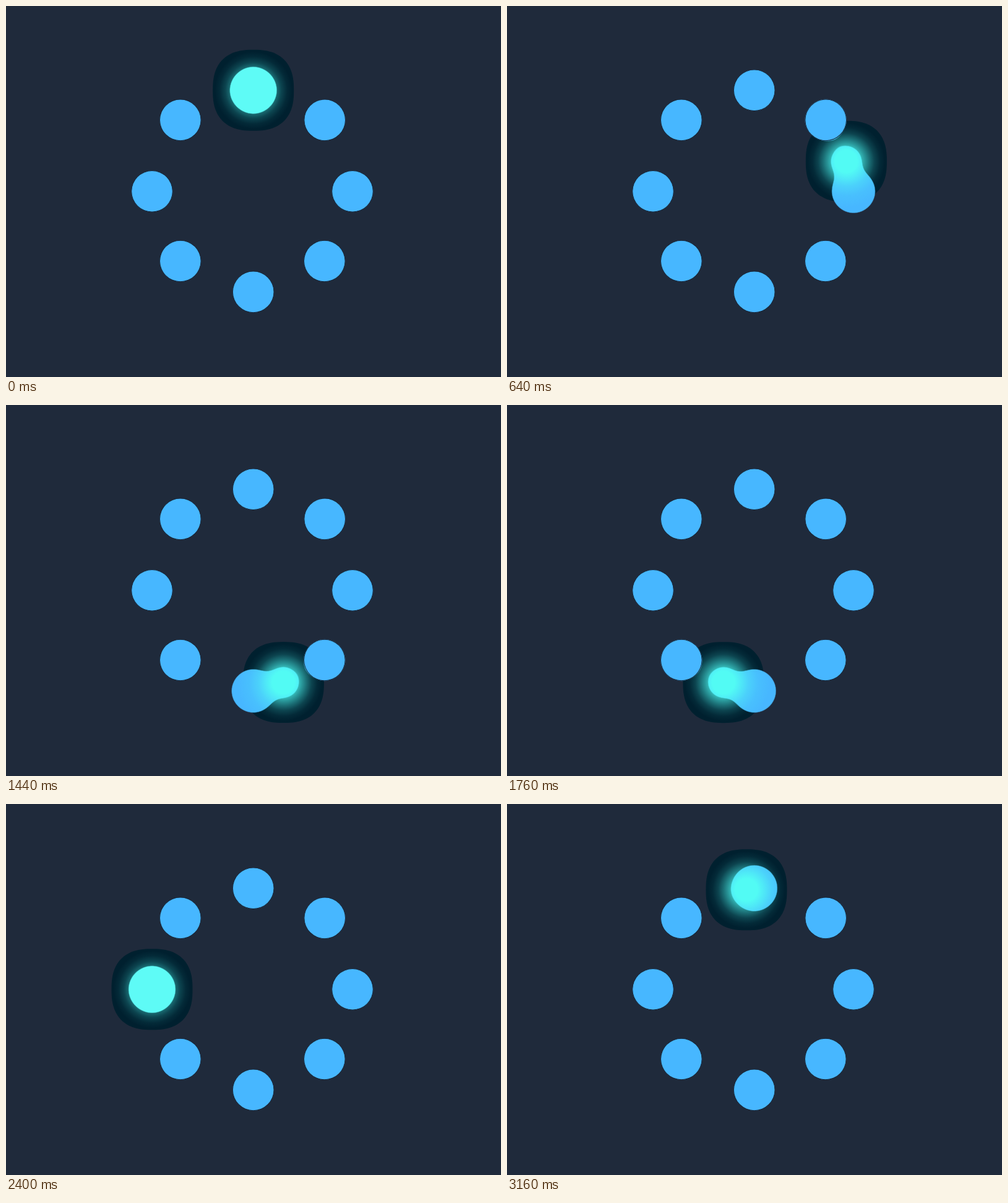
An HTML page that plays this animation: 800 px wide and 600 px high, repeating every 3.2 s.

```html
<!DOCTYPE html>
<html lang="en">
<head>
<meta charset="utf-8">
<title>Gooey loader</title>
<style>
  html, body { margin: 0; width: 100%; height: 100%; overflow: hidden; background: #1f2a3b; }
  svg { display: block; width: 800px; height: 600px; }
  #dots circle { fill: #47b7ff; stroke: #131e2e; stroke-width: 1.6px; paint-order: stroke; }
</style>
</head>
<body>
<svg viewBox="0 0 800 600">
  <defs>
    <filter id="goo" filterUnits="userSpaceOnUse" x="0" y="0" width="800" height="600" color-interpolation-filters="sRGB">
      <feGaussianBlur stdDeviation="10"/>
      <feColorMatrix values="1 0 0 0 0  0 1 0 0 0  0 0 1 0 0  0 0 0 18 -7.3"/>
    </filter>
    <mask id="blob" maskUnits="userSpaceOnUse" x="0" y="0" width="800" height="600">
      <g id="shapes" filter="url(#goo)" fill="#fff"></g>
    </mask>
    <radialGradient id="glow" gradientUnits="userSpaceOnUse" cx="0" cy="0" r="65">
      <stop offset=".36" stop-color="#45e8e2" stop-opacity=".8"/>
      <stop offset=".46" stop-color="#45e8e2" stop-opacity=".6"/>
      <stop offset=".58" stop-color="#45e8e2" stop-opacity=".38"/>
      <stop offset=".7" stop-color="#45e8e2" stop-opacity=".18"/>
      <stop offset=".84" stop-color="#45e8e2" stop-opacity=".05"/>
      <stop offset=".96" stop-color="#45e8e2" stop-opacity="0"/>
    </radialGradient>
    <radialGradient id="tint" gradientUnits="userSpaceOnUse" cx="0" cy="0" r="75">
      <stop offset=".24" stop-color="#52fbf4"/>
      <stop offset=".38" stop-color="#52fbf4" stop-opacity=".72"/>
      <stop offset=".54" stop-color="#52fbf4" stop-opacity=".38"/>
      <stop offset=".74" stop-color="#52fbf4" stop-opacity=".13"/>
      <stop offset="1" stop-color="#52fbf4" stop-opacity="0"/>
    </radialGradient>
  </defs>
  <g class="follow">
    <path id="halo" fill="#00202f"/>
    <circle r="65" fill="url(#glow)"/>
  </g>
  <g mask="url(#blob)">
    <rect width="800" height="600" fill="#47b7ff"/>
    <circle class="follow" r="75" fill="url(#tint)"/>
    <circle id="flash" r="42" fill="#5efbf6"/>
  </g>
  <g id="dots"></g>
</svg>
<script>
const LOOP = 3200, STEP = 40, DOT = 33, BALL = 25, BULGE = 7, HALO = 65.5;
const spots = [[399.7, 136.3], [515.2, 184.4], [560, 299.8], [514.8, 412.5],
               [399.7, 462.4], [281.8, 412.5], [236, 299.8], [281.8, 184.4]];
const find = id => document.getElementById(id);

function addCircle(parent, [x, y], r) {
  const c = document.createElementNS('http://www.w3.org/2000/svg', 'circle');
  c.setAttribute('cx', x);
  c.setAttribute('cy', y);
  c.setAttribute('r', r);
  return parent.appendChild(c);
}
const place = (el, x, y) => el.setAttribute('transform', `translate(${x} ${y})`);

const dots = spots.map(p => addCircle(find('dots'), p, DOT - .2));
const blobs = spots.map(p => addCircle(find('shapes'), p, DOT));
const ball = addCircle(find('shapes'), [0, 0], BALL);
const followers = [ball, ...document.querySelectorAll('.follow')];

// Superellipse outline of the halo
const bend = v => Math.sign(v) * Math.abs(v) ** .8 * HALO;
find('halo').setAttribute('d', 'M' + Array.from({ length: 120 }, (_, i) => {
  const a = i * Math.PI / 60;
  return bend(Math.cos(a)).toFixed(2) + ' ' + bend(Math.sin(a)).toFixed(2);
}).join('L') + 'Z');

function draw(ms) {
  const n = spots.length;
  const pos = Math.floor(ms % LOOP / STEP) * STEP / LOOP * n;
  const i = Math.floor(pos), u = pos - i;
  const [x0, y0] = spots[i], [x1, y1] = spots[(i + 1) % n];
  const dx = x1 - x0, dy = y1 - y0;
  const lift = BULGE * 4 * u * (1 - u) / Math.hypot(dx, dy);
  const x = x0 + dx * u + dy * lift, y = y0 + dy * u - dx * lift;
  followers.forEach(el => place(el, x, y));

  spots.forEach((p, k) => {
    const gap = Math.abs(pos - k), away = Math.min(gap, n - gap);
    blobs[k].setAttribute('r', DOT + 4.5 * Math.max(0, 1 - away / .64));
    dots[k].style.display = away < .5 ? 'none' : '';
  });
  place(find('flash'), ...spots[Math.round(pos) % n]);
  find('flash').setAttribute('opacity', Math.max(0, 1 - Math.min(u, 1 - u) / .1));
}

const start = performance.now();
function tick() {
  draw(performance.now() - start);
  requestAnimationFrame(tick);
}
tick();
</script>
</body>
</html>
```
